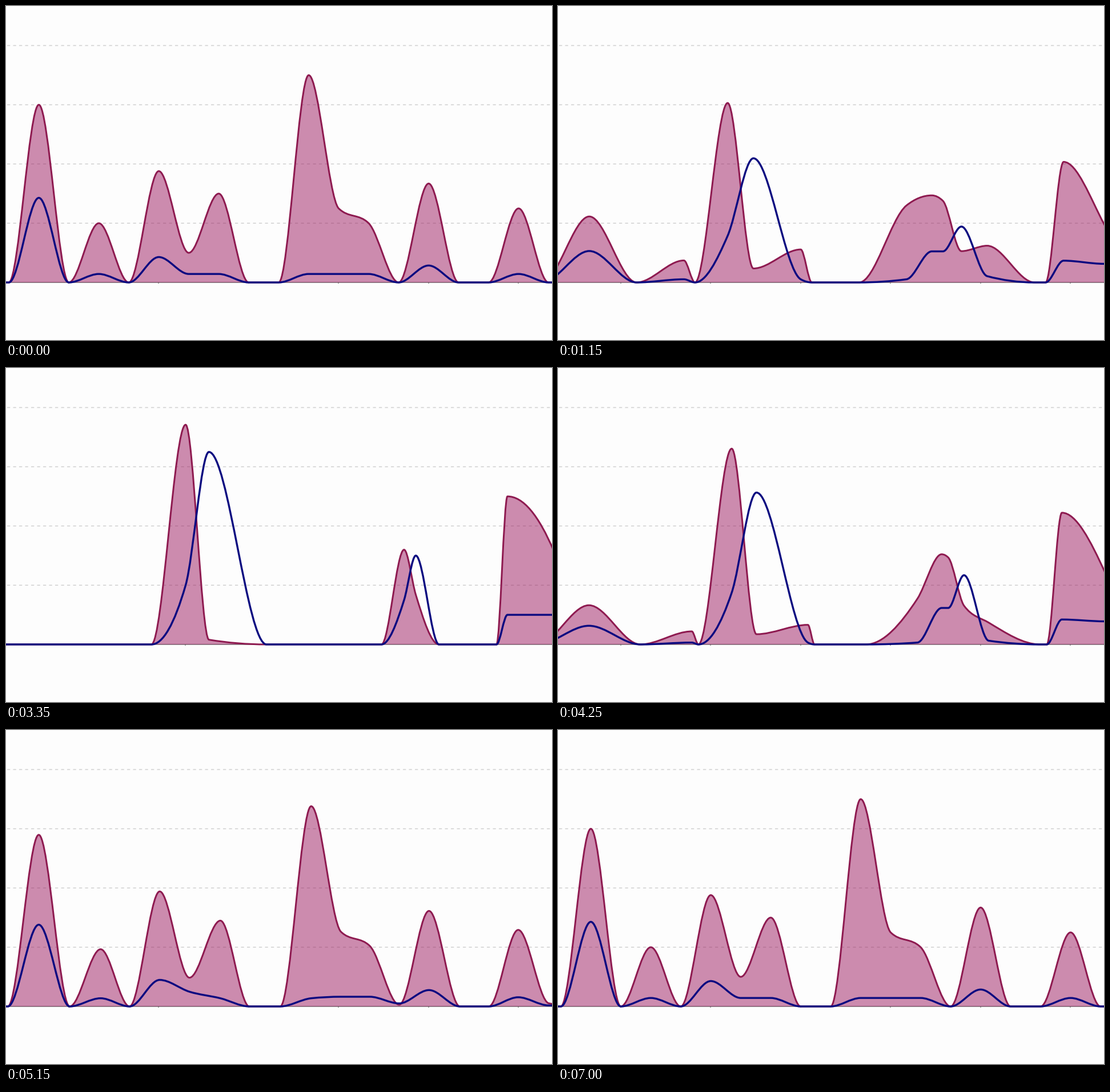
Animation of 956x586 px, one loop 7050 ms. Source, as a matplotlib script:

```python
import matplotlib.pyplot as plt
import numpy as np
from matplotlib.animation import FuncAnimation
from matplotlib.patches import PathPatch
from matplotlib.path import Path

W, H, DPI = 956, 586, 100
PX = 72 / DPI
STEP, FRAMES = 50, 141
BASE, GRID = 485, 103.9
MORPH, RETURN = 1500, 4000  # ms
LEFT, EVEN_GAP, UNEVEN_GAP = -47.5, 52.5, 100.7

PINK, FILL, NAVY = "#8e1a50", "#9d1b60", "#0a0a80"


def even_view():
    """One point per regular slot: x, area height, line height."""
    n = np.arange(21)
    area = np.zeros(n.size)
    area[[2, 4, 6, 7, 8]] = 3, 1, 1.88, 0.5, 1.5
    area[[11, 12, 13, 15, 18]] = 3.5, 1.25, 1, 1.67, 1.25
    count = (area > 0).astype(float)
    count[[2, 6, 15]] = 10, 3, 2
    return np.array([LEFT + EVEN_GAP * n, area * GRID, count * GRID / 7])


def uneven_view():
    """Coarser regular slots with a few extra moments in between."""
    slots = LEFT + UNEVEN_GAP * np.arange(11)
    points = {x: (0, 0) for x in slots}
    points.update({
        314.5: (3.71, 1), slots[4]: (0.08, 3.25),
        697: (1.6, 0.75), 717.5: (0.84, 1.5),
        878: (2.5, 0.5), slots[10]: (1.57, 0.5), 1005: (0, 0.5)})
    xs = sorted(points)
    heights = GRID * np.array([points[x] for x in xs])
    return np.array([xs, *heights.T])


even, uneven = even_view(), uneven_view()
# Fewer points here, so some are paired with two neighbours
spread = uneven[:, np.arange(21) * 3 // 4]

s = np.linspace(0, 1, 500)
ease_x = 0.75 * s * (1 - s) ** 2 + 0.75 * s**2 * (1 - s) + s**3
ease_y = 0.3 * s * (1 - s) ** 2 + 3 * s**2 * (1 - s) + s**3


def ease(u):
    return np.interp(u, ease_x, ease_y)


def monotone(x, y):
    """Cubic path through the points that never overshoots."""
    h = np.diff(x)
    d = np.diff(y) / h
    p = np.abs(d[:-1] * h[1:] + d[1:] * h[:-1]) / (h[:-1] + h[1:])
    low = np.minimum(np.minimum(np.abs(d[:-1]), np.abs(d[1:])), p / 2)
    m = np.zeros(len(x))
    m[1:-1] = (np.sign(d[:-1]) + np.sign(d[1:])) * low
    m[0] = (3 * d[0] - m[1]) / 2
    m[-1] = (3 * d[-1] - m[-2]) / 2
    verts = [(x[0], y[0])]
    for i, w in enumerate(h / 3):
        verts += [(x[i] + w, y[i] + w * m[i]),
                  (x[i + 1] - w, y[i + 1] - w * m[i + 1]),
                  (x[i + 1], y[i + 1])]
    return Path(verts, [Path.MOVETO] + [Path.CURVE4] * (len(verts) - 1))


def closed(path):
    v = path.vertices
    verts = np.vstack([v, [(v[-1, 0], BASE), (v[0, 0], BASE), v[0]]])
    codes = list(path.codes) + [Path.LINETO, Path.LINETO, Path.CLOSEPOLY]
    return Path(verts, codes)


plt.rcParams["lines.scale_dashes"] = False
fig = plt.figure(figsize=(W / DPI, H / DPI), dpi=DPI, facecolor="#fdfdfd")
ax = fig.add_axes([0, 0, 1, 1])
ax.set_xlim(0, W)
ax.set_ylim(H, 0)
ax.axis("off")

for k in range(1, 5):
    ax.plot([2, W], [BASE - k * GRID] * 2, color="#d2d2d2", lw=1.6 * PX,
            ls=(0, (5.25 * PX, 5.25 * PX)), dash_capstyle="butt",
            snap=False, zorder=0)
ax.plot([0, W], [BASE, BASE], color="#777777", lw=1.6 * PX, snap=False,
        zorder=0)


def ticks(xs):
    return ax.vlines(xs, BASE, BASE + 2, color="#777777", lw=1.5 * PX,
                     zorder=0)


even_ticks = ticks(110 + 3 * EVEN_GAP * np.arange(6))
uneven_ticks = ticks([314.5])


def add_curve(**style):
    patch = PathPatch(Path([(0, BASE), (W, BASE)]), **style)
    return ax.add_patch(patch)


fill = add_curve(fc=FILL, ec="none", lw=0, alpha=0.5)
edge = add_curve(fc="none", ec=PINK, lw=3 * PX, joinstyle="round")
line = add_curve(fc="none", ec=NAVY, lw=3.4 * PX, joinstyle="round")


def points_at(t):
    """The way out is the way back played in reverse."""
    if MORPH <= t <= RETURN:
        return uneven
    u = (MORPH - t) / MORPH if t < MORPH else (t - RETURN) / MORPH
    return spread + (even - spread) * ease(min(u, 1))


def draw(i):
    t = i * STEP
    x, area, val = points_at(t)
    top = monotone(x, BASE - area)
    fill.set_path(closed(top))
    edge.set_path(top)
    line.set_path(monotone(x, BASE - val))
    resting = MORPH <= t <= RETURN
    even_ticks.set_visible(not resting)
    uneven_ticks.set_visible(resting)
    return fill, edge, line, even_ticks, uneven_ticks


anim = FuncAnimation(fig, draw, frames=FRAMES, interval=STEP, repeat=True,
                     repeat_delay=0, blit=False)
plt.show()
```
